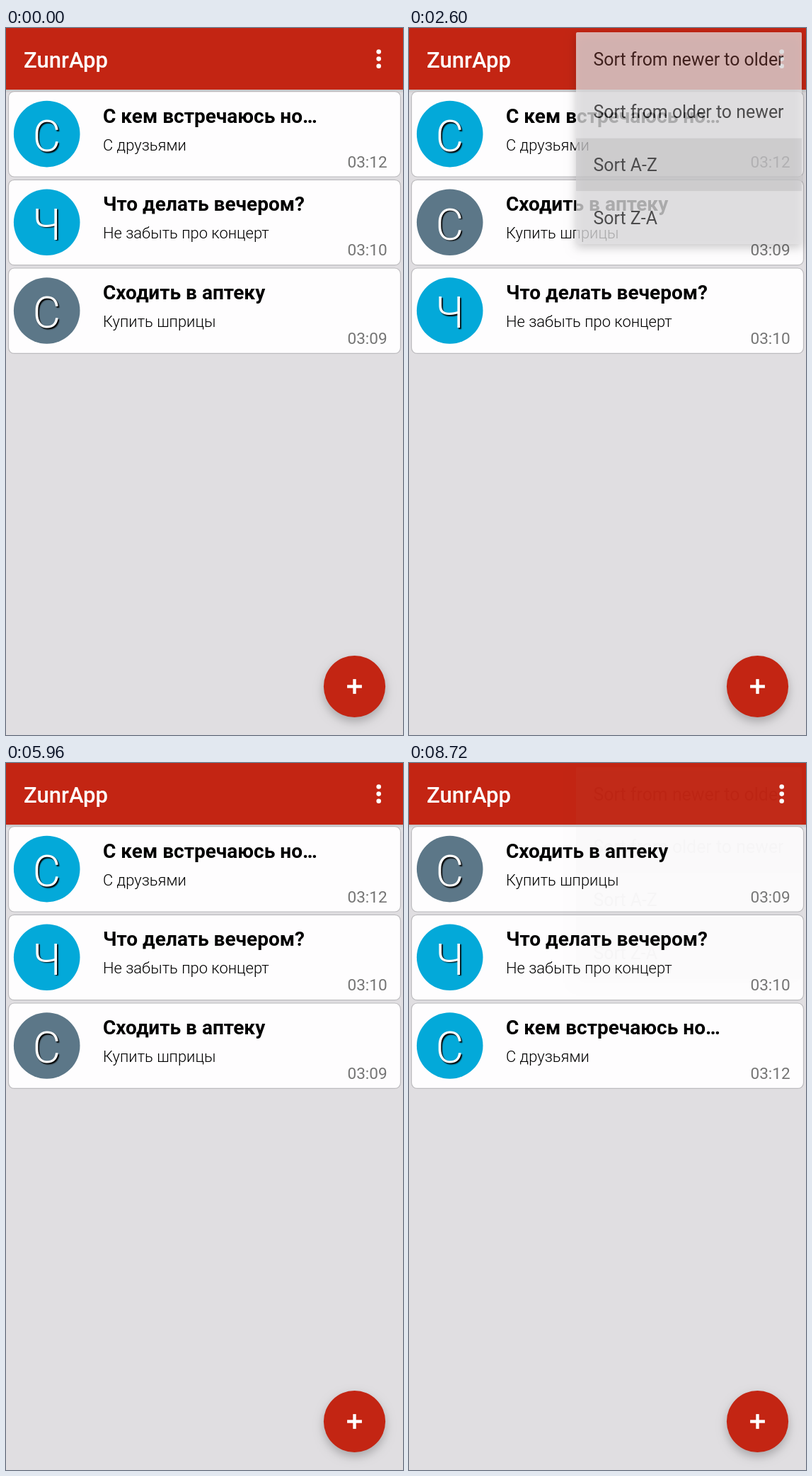
Animation, 561 px wide and 998 px high, one loop 8760 ms. Source, as an HTML page with a canvas:

```html
<!DOCTYPE html>
<html lang="ru">
<head>
<meta charset="utf-8">
<title>Notes</title>
<style>
  html, body { margin: 0; width: 100%; height: 100%; overflow: hidden; background: #e0dee1; }
  canvas { display: block; width: 561px; height: 998px; }
</style>
</head>
<body>
<canvas id="stage" width="561" height="998"></canvas>
<script>
const W = 561, H = 998, LOOP = 8760;
const RED = '#c32513', BLUE = '#03a9d9', GREY = '#5c7788';
const FONT = 'Roboto, "Noto Sans", sans-serif';
const ROW = 124.7, ITEM = 74.75;
const MENU = { l: 236, t: 6, r: 555, b: 305 };
const BUTTON = { l: 492, t: 6, r: 562, b: 87, x: 527, y: 43.5 };
const ITEMS = ['Sort from newer to older', 'Sort from older to newer', 'Sort A-Z', 'Sort Z-A'];

const NOTES = {
  meet: ['С кем встречаюсь но…', 'С друзьями', '03:12', BLUE],
  evening: ['Что делать вечером?', 'Не забыть про концерт', '03:10', BLUE],
  pharmacy: ['Сходить в аптеку', 'Купить шприцы', '03:09', GREY]
};
const NEWEST = ['meet', 'evening', 'pharmacy'];
const OLDEST = ['pharmacy', 'evening', 'meet'];
const ALPHA = ['meet', 'pharmacy', 'evening'];

// tap: overflow button, open: menu appears, press: item touched, close: menu fades
const VISITS = [
  { tap: 1270, open: 1403, press: 2390, close: 2550, item: 2, order: ALPHA },
  { tap: 4110, open: 4142, press: 5430, close: 5755, item: 0, order: NEWEST },
  { tap: 7550, open: 7583, press: 8350, close: 8526, item: 1, order: OLDEST }
];

const stage = document.getElementById('stage').getContext('2d');
const layer = document.createElement('canvas');
layer.width = W;
layer.height = H;
const menuCtx = layer.getContext('2d');

const clamp = v => Math.min(1, Math.max(0, v));
const mix = (a, b, p) => a + (b - a) * p;

// cubic easing with y1 = 0 and y2 = 1
function bezier(x1, x2) {
  return x => {
    let lo = 0, hi = 1;
    for (let i = 0; i < 24; i++) {
      const s = (lo + hi) / 2, q = 1 - s;
      if (3 * q * q * s * x1 + 3 * q * s * s * x2 + s * s * s < x) lo = s; else hi = s;
    }
    return 3 * (1 - lo) * lo * lo + lo * lo * lo;
  };
}
const easeX = bezier(0, 0.2), easeY = bezier(0.4, 0.2);

function text(c, str, x, y, size, weight, color, align = 'left') {
  c.font = `${weight} ${size}px ${FONT}`;
  c.textAlign = align;
  c.fillStyle = color;
  c.fillText(str, x, y);
}

function disc(c, x, y, r, color) {
  c.fillStyle = color;
  c.beginPath();
  c.arc(x, y, r, 0, Math.PI * 2);
  c.fill();
}

function withShadow(c, color, blur, dx, dy, draw) {
  c.save();
  c.shadowColor = color;
  c.shadowBlur = blur;
  c.shadowOffsetX = dx;
  c.shadowOffsetY = dy;
  draw();
  c.restore();
}

function drawCard(c, note, i) {
  const [title, body, time, color] = note;
  const y = i * ROW;
  c.beginPath();
  c.roundRect(3.5, 89.6 + y, 554, 120.4, 8);
  c.fillStyle = '#fefdfe';
  c.fill();
  c.strokeStyle = '#bcbbbe';
  c.lineWidth = 1.2;
  c.stroke();

  disc(c, 57.7, 149.6 + y, 46.8, color);
  withShadow(c, '#000', 1.5, 1.6, 1.6, () =>
    text(c, title[0], 57.5, 174 + y, 60.5, 300, '#fff', 'center'));

  text(c, title, 137, 133.6 + y, 28, 700, '#000');
  text(c, body, 137, 172.5 + y, 21.95, 300, '#000');
  text(c, time, 538.7, 196.6 + y, 22.6, 400, '#757575', 'right');
}

function drawBar(c) {
  const shade = c.createLinearGradient(0, 87, 0, 92);
  shade.addColorStop(0, 'rgba(0,0,0,.12)');
  shade.addColorStop(1, 'rgba(0,0,0,0)');
  c.fillStyle = shade;
  c.fillRect(0, 87, W, 5);
  c.fillStyle = RED;
  c.fillRect(0, 0, W, 87);
  text(c, 'ZunrApp', 25, 56, 31.1, 500, '#fff');
}

function drawFab(c) {
  withShadow(c, 'rgba(0,0,0,.25)', 14, 0, 6, () => disc(c, 492.5, 929.5, 43.6, RED));
  c.fillStyle = '#fff';
  c.fillRect(482.1, 927.3, 20.8, 4.4);
  c.fillRect(490.3, 919.1, 4.4, 20.8);
}

function drawTap(c, age) {
  if (age <= 0 || age >= 480) return;
  const fade = clamp(age / 80) * clamp((480 - age) / 250);
  disc(c, BUTTON.x, BUTTON.y, mix(10, 30, clamp(age / 225)), `rgba(255,255,255,${0.09 * fade})`);
}

function drawPress(c, item, age) {
  if (age <= 0) return;
  const y = MENU.t + item * ITEM, width = MENU.r - MENU.l;
  c.save();
  c.beginPath();
  c.rect(MENU.l, y, width, ITEM);
  c.clip();
  c.fillStyle = `rgba(0,0,0,${0.05 * clamp(age / 120)})`;
  c.fillRect(MENU.l, y, width, ITEM);
  disc(c, 395, y + ITEM / 2, mix(20, 190, clamp(age / 200)), `rgba(0,0,0,${0.05 * clamp(age / 80)})`);
  c.restore();
}

function drawMenu(t, visit) {
  const c = menuCtx;
  const p = clamp((t - visit.open) / 300);
  const px = easeX(p), py = easeY(p);
  const l = Math.round(mix(BUTTON.l, MENU.l, px)), r = Math.round(mix(BUTTON.r, MENU.r, px));
  const top = Math.round(mix(BUTTON.t, MENU.t, py)), b = Math.round(mix(BUTTON.b, MENU.b, py));
  const dx = (BUTTON.x - (MENU.l + MENU.r) / 2) * (1 - px);
  const dy = (BUTTON.y - (MENU.t + MENU.b) / 2) * (1 - py);

  c.clearRect(0, 0, W, H);
  c.save();
  c.beginPath();
  c.roundRect(l, top, r - l, b - top, 2);
  c.clip();
  c.fillStyle = '#e5e4e6';
  c.fillRect(l, top, r - l, b - top);
  c.translate(dx, dy);
  drawPress(c, visit.item, t - visit.press);
  ITEMS.forEach((s, i) => text(c, s, 260.5, 52.6 + i * ITEM, 24.9, 400, '#212122'));
  c.restore();

  // the shadow rises with the menu and shows through it while it fades
  stage.globalAlpha = clamp((t - visit.open) / 100) * (1 - clamp((t - visit.close) / 200));
  withShadow(stage, `rgba(0,0,0,${0.27 * py})`, 13 * py, 2 * W, 5 * py, () => {
    stage.fillStyle = '#000';
    stage.fillRect(l - 2 * W, top, r - l, b - top);
  });
  stage.drawImage(layer, 0, 0);
  stage.globalAlpha = 1;
}

function draw(t) {
  const c = stage;
  c.fillStyle = '#e0dee1';
  c.fillRect(0, 0, W, H);
  drawBar(c);
  const order = VISITS.reduce((o, v) => t >= v.close ? v.order : o, NEWEST);
  order.forEach((key, i) => drawCard(c, NOTES[key], i));
  drawFab(c);
  VISITS.forEach(v => drawTap(c, t - v.tap));
  for (const y of [33.5, 43.6, 53.7]) disc(c, 526.7, y, 3.3, '#fff');
  const visit = VISITS.find(v => t > v.open && t < v.close + 200);
  if (visit) drawMenu(t, visit);
}

const start = performance.now();
function tick() {
  draw((performance.now() - start) % LOOP);
  requestAnimationFrame(tick);
}
tick();
</script>
</body>
</html>
```
